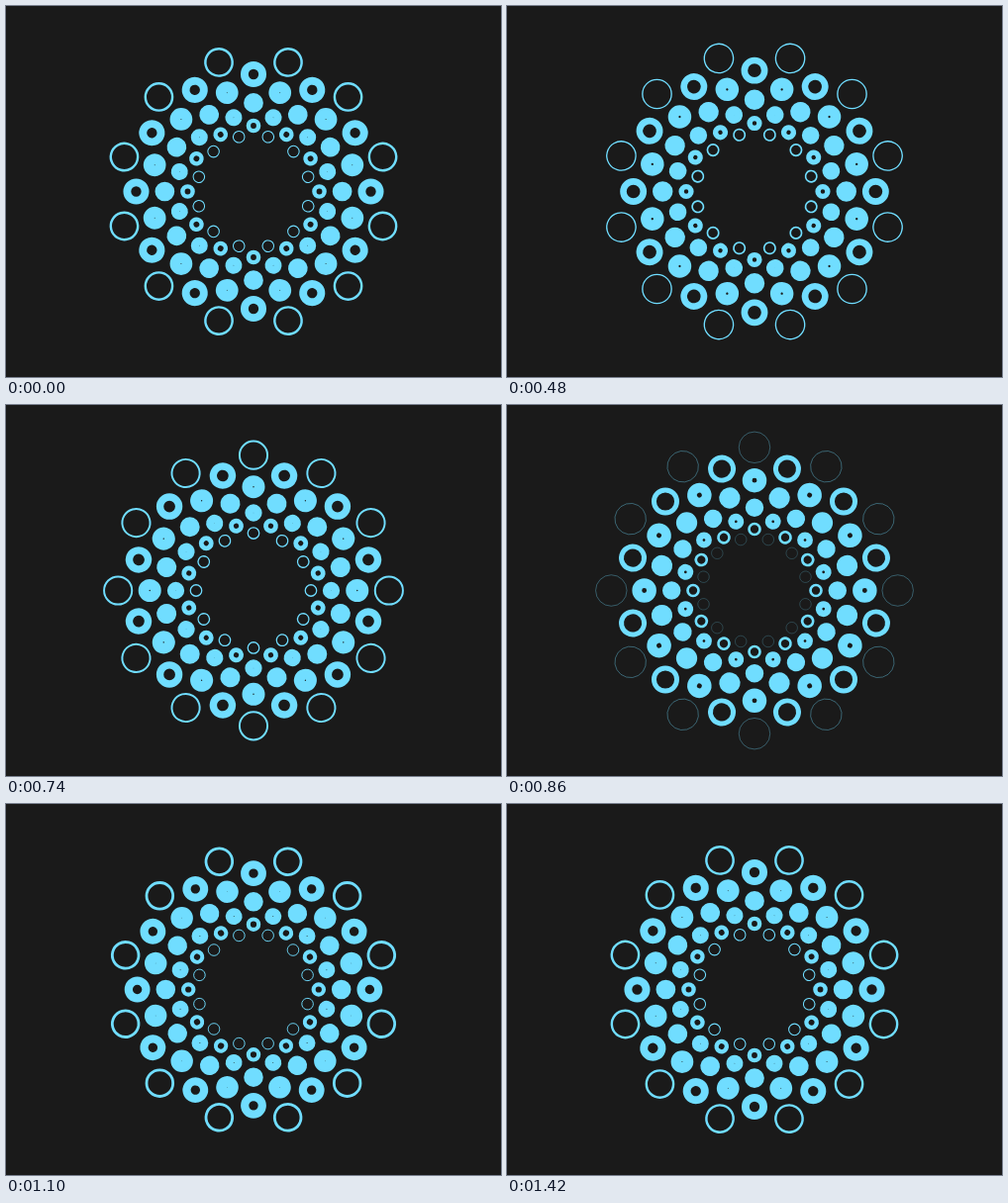
Recreate the animation shown at these times as an HTML page without scripts. Size 500 px wide and 375 px high, loop 1.44 s.

```html
<!DOCTYPE html>
<html lang="en">
<head>
<meta charset="utf-8">
<title>Expanding rings</title>
<style>
  @property --progress { syntax: "<number>"; inherits: true; initial-value: 0; }
  @property --x { syntax: "<number>"; inherits: true; initial-value: 0; }
  @property --distance { syntax: "<number>"; inherits: true; initial-value: 0; }
  @property --ramp { syntax: "<number>"; inherits: true; initial-value: 0; }
  @property --hole { syntax: "<number>"; inherits: true; initial-value: 0; }

  html, body {
    margin: 0;
    width: 100%;
    height: 100%;
    overflow: hidden;
    background: #1a1a1a;
  }

  svg {
    display: block;
    width: 100%;
    height: 100%;
    animation: expand 1440ms infinite;
  }

  /* Each loop moves every ring outward by two places. */
  @keyframes expand {
    0% { --progress: 0; animation-timing-function: cubic-bezier(.45, 0, .72, .02); }
    50% { --progress: .5; animation-timing-function: cubic-bezier(.28, .98, .55, 1); }
    100% { --progress: 1; }
  }

  /* Discs are solid around place 5 and hollow out towards both ends. */
  .ring {
    --x: calc(var(--place) + 2 * var(--progress));
    --distance: calc(42.7 + 5.77 * var(--x) + .723 * var(--x) * var(--x));
    --ramp: clamp(0, (max(var(--x) - 5, 5 - var(--x)) - .62) / 3.2, 1);
    --hole: calc(var(--ramp) * var(--ramp) * (3 - 2 * var(--ramp)));
  }

  #dot {
    --radius: calc(var(--distance) * .11px);
    cy: calc(var(--distance) * -1px);
    r: calc(var(--radius) * (1 + var(--hole)) / 2);
    stroke-width: calc(var(--radius) * (1 - var(--hole)));
    stroke: #70ddff;
    fill: none;
  }
</style>
</head>
<body>
<svg viewBox="0 0 500 375">
  <defs>
    <circle id="dot"/>
    <g id="quarter">
      <use href="#dot"/>
      <use href="#dot" transform="rotate(30)"/>
      <use href="#dot" transform="rotate(60)"/>
    </g>
    <g id="circle-of-dots">
      <use href="#quarter"/>
      <use href="#quarter" transform="rotate(90)"/>
      <use href="#quarter" transform="rotate(180)"/>
      <use href="#quarter" transform="rotate(270)"/>
    </g>
  </defs>
  <g transform="translate(250 187.5)">
    <use class="ring" href="#circle-of-dots" style="--place: 1"/>
    <use class="ring" href="#circle-of-dots" style="--place: 3"/>
    <use class="ring" href="#circle-of-dots" style="--place: 5"/>
    <use class="ring" href="#circle-of-dots" style="--place: 7"/>
    <g transform="rotate(15)">
      <use class="ring" href="#circle-of-dots" style="--place: 0"/>
      <use class="ring" href="#circle-of-dots" style="--place: 2"/>
      <use class="ring" href="#circle-of-dots" style="--place: 4"/>
      <use class="ring" href="#circle-of-dots" style="--place: 6"/>
      <use class="ring" href="#circle-of-dots" style="--place: 8"/>
    </g>
  </g>
</svg>
</body>
</html>
```
